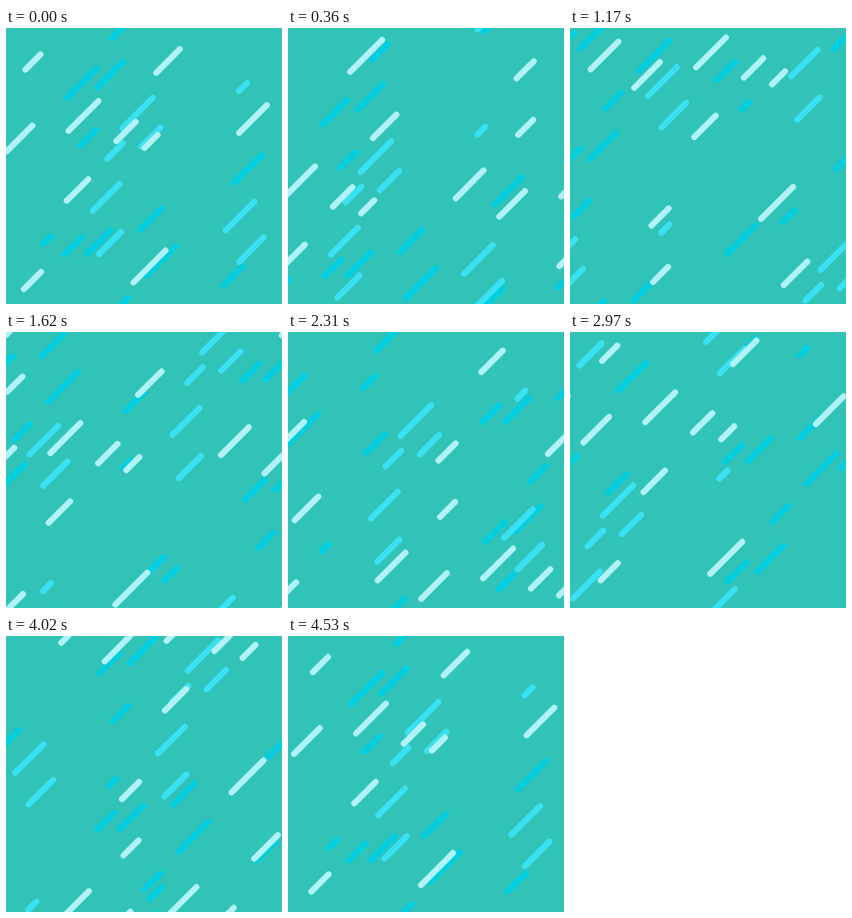
An HTML page with a canvas for the animation above (4560 ms loop, 276x276 px).

```html
<!DOCTYPE html>
<html>
<head>
<meta charset="utf-8">
<style>
html, body { margin: 0; height: 100%; overflow: hidden; background: #32c3b8; }
canvas { display: block; }
</style>
</head>
<body>
<canvas id="stage" width="276" height="276"></canvas>
<script>
const SIZE = 276, LOOP = 4560, STEP = 30;
const DARK = '#02cee1', MID = '#3ae1f3', LIGHT = '#b0f2f6';

// laps: stage lengths travelled per loop.
// centers: streak midpoints from shortest to longest; their lengths
// grow from min to max along a power curve.
const layers = [
  { color: DARK, laps: 1, min: 15, max: 30, curve: 1.4, centers: [
    [82, 110], [114, 2], [67, 218], [227, 248], [71, 60],
    [145, 191], [93, 214], [104, 47], [242, 141], [155, 233]] },
  { color: DARK, laps: 2, min: 7.5, max: 12, curve: 1, centers: [[41, 212], [84.5, 46.5]] },
  { color: MID, laps: 2, min: 8, max: 30.5, curve: 0.55, centers: [
    [237, 59], [109, 123], [145, 109], [104, 215],
    [245.5, 221.5], [100, 169.5], [234, 188], [131.5, 85]] },
  { color: LIGHT, laps: 3, min: 13, max: 32, curve: 1, centers: [
    [145, 113.5], [27, 34], [26.5, 252.5], [120, 103.5], [71.5, 162],
    [162, 33], [13.5, 110.5], [247, 91], [77.5, 88], [143.5, 238.5]] }
];

const ctx = document.getElementById('stage').getContext('2d');
const wrap = v => ((v % SIZE) + SIZE) % SIZE;

// Repeats a streak across the edges so the layer tiles seamlessly.
function addStreak(x, y, length) {
  for (const left of [x, x - SIZE]) {
    for (const bottom of [y, y + SIZE]) {
      ctx.moveTo(left, bottom);
      ctx.lineTo(left + length, bottom - length);
    }
  }
}

function drawLayer({ color, laps, min, max, curve, centers }, progress) {
  const shift = progress * laps * SIZE;
  ctx.strokeStyle = color;
  ctx.beginPath();
  centers.forEach(([x, y], i) => {
    const length = min + (max - min) * (i / (centers.length - 1)) ** curve;
    addStreak(wrap(x - length / 2 - shift), wrap(y + length / 2 + shift), length);
  });
  ctx.stroke();
}

function render(time) {
  const progress = Math.floor((time % LOOP) / STEP) * STEP / LOOP;
  ctx.clearRect(0, 0, SIZE, SIZE);
  ctx.lineWidth = 6;
  ctx.lineCap = 'round';
  for (const layer of layers) drawLayer(layer, progress);
}

const start = performance.now();
function tick() {
  render(performance.now() - start);
  requestAnimationFrame(tick);
}
tick();
</script>
</body>
</html>
```
